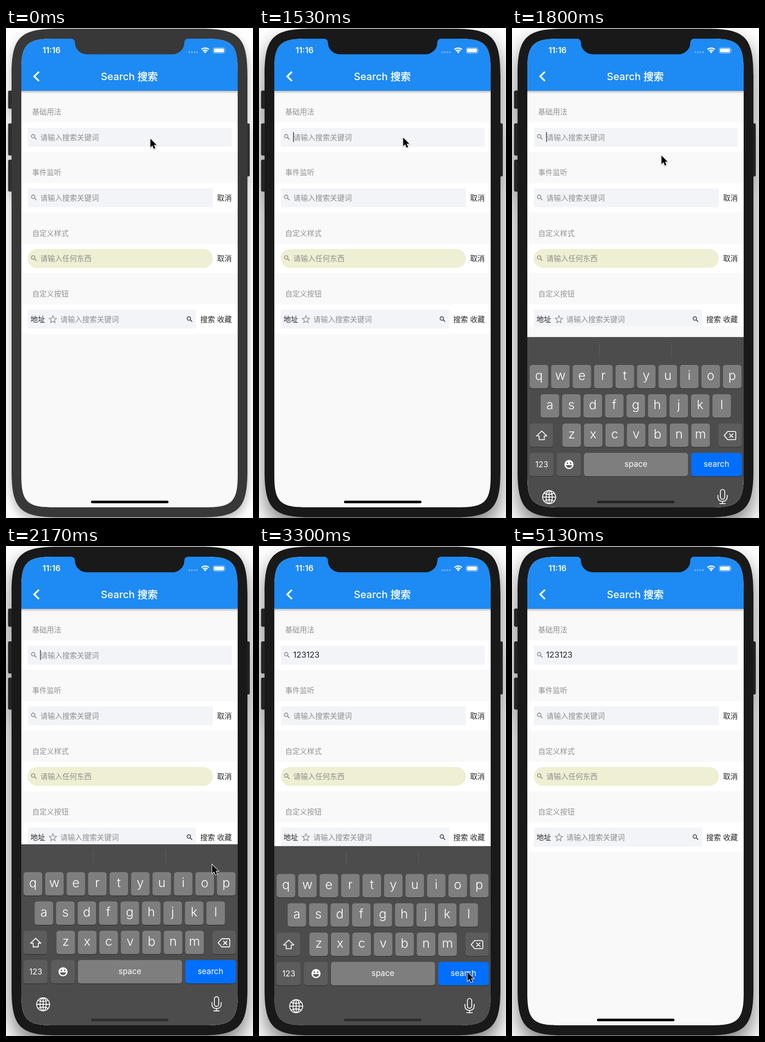
An HTML page that plays this animation: 532 by 1053 pixels, repeating every 5160 ms.

```html
<!DOCTYPE html>
<html lang="zh">
<head>
<meta charset="utf-8">
<title>Search</title>
<style>
  html, body { margin: 0; width: 100%; height: 100%; overflow: hidden; background: #fff; }
  svg { display: block; width: 100%; height: 100%; font-family: Inter, "Noto Sans CJK SC", "Noto Sans CJK", sans-serif; }
  #device { --body: #383838; --button: #2d2d2d; --shadow: drop-shadow(0 10px 11px rgba(0,0,0,.3)); }
  #device.active { --body: #191919; --button: #242424; --shadow: drop-shadow(0 22px 22px rgba(0,0,0,.52)); }
  .shell { filter: var(--shadow); }
  .body { fill: var(--body); }
  .button { fill: var(--button); stroke: var(--body); }
  .hint, .label { font-size: 15.76px; fill: #8e8e8e; }
  .label { fill: #929292; }
  .action { font-size: 15.76px; fill: #262626; }
  .field { fill: #f3f4f8; }
  .line { fill: none; stroke: #fff; stroke-width: 1.8; stroke-linecap: round; stroke-linejoin: round; }
  .letter { font-size: 27.5px; font-weight: 300; }
  .word { font-size: 17.2px; }
  .medium { stroke: #fff; stroke-width: .5px; }
  #keyboard text { fill: #fff; text-anchor: middle; }
</style>
</head>
<body>
<svg viewBox="0 0 532 1053">
  <defs>
    <clipPath id="screenClip"><path id="screenShape"/></clipPath>
    <linearGradient id="headerShadow" x1="0" y1="0" x2="0" y2="1">
      <stop offset="0" stop-color="#000" stop-opacity=".24"/>
      <stop offset="1" stop-color="#000" stop-opacity="0"/>
    </linearGradient>
    <path id="lens" d="M15.5 14h-.79l-.28-.27A6.47 6.47 0 0 0 16 9.5 6.5 6.5 0 1 0 9.5 16c1.61 0 3.09-.59 4.23-1.57l.27.28v.79l5 4.99L20.49 19zM9.5 14a4.5 4.5 0 1 1 0-9 4.5 4.5 0 0 1 0 9z"/>
  </defs>

  <g id="device">
    <g class="shell">
      <g class="button">
        <rect x="5" y="135" width="10" height="38" rx="2"/>
        <rect x="5" y="205.500" width="10" height="68" rx="2"/>
        <rect x="5" y="283.500" width="10" height="67.500" rx="2"/>
        <rect x="516" y="205.500" width="8.500" height="113" rx="2"/>
      </g>
      <path id="bodyShape" class="body"/>
    </g>

    <g clip-path="url(#screenClip)">
      <rect x="33" y="23" width="467" height="1008" fill="#f9f9f9"/>
      <g id="list"></g>
      <text id="typed" x="73.500" y="239.800" font-size="17.400" fill="#222"></text>
      <rect id="caret" y="223.500" width="1.500" height="21.500" fill="#333"/>
      <rect id="inset" x="33" y="641" width="467" height="390" fill="#f9f9f9"/>

      <rect x="33" y="135" width="467" height="6" fill="url(#headerShadow)"/>
      <rect x="33" y="23" width="467" height="112" fill="#1e8af3"/>
      <g fill="#fff">
        <text x="98" y="54" font-size="17.500" font-weight="600" text-anchor="middle">11:16</text>
        <text x="265.500" y="111.500" font-size="21.800" font-weight="500" text-anchor="middle">Search <tspan class="medium">搜索</tspan></text>
        <g opacity=".35">
          <circle cx="394.800" cy="52" r="2"/><circle cx="400.300" cy="52" r="2"/>
          <circle cx="405.800" cy="52" r="2"/><circle cx="411.200" cy="52" r="2"/>
        </g>
        <path d="M429 54.500L426 51.300A4.300 4.300 0 0 1 432 51.300Z"/>
        <rect x="448" y="44" width="21.500" height="8.600" rx="1.800"/>
        <path d="M473.400 46.300q1.700 2 0 4z" opacity=".6"/>
      </g>
      <g fill="none" stroke="#fff">
        <path d="M421 46.200A11.400 11.400 0 0 1 437 46.200M424 49.400A7.200 7.200 0 0 1 434 49.400" stroke-width="2.500"/>
        <rect x="446.200" y="42.200" width="25.300" height="12.200" rx="3.400" stroke-opacity=".6"/>
        <path d="M71 94L60.800 104L71 114" stroke-width="3.800"/>
      </g>

      <g id="keyboard"></g>
      <rect id="homeBar" x="183" y="1015.700" width="167" height="5.600" rx="2.800"/>
    </g>
    <path class="body" d="M139 22V23Q148.500 23 148.500 32A26 24.500 0 0 0 175 56.500H358A26 24.500 0 0 0 384 32Q384 23 393 23V22Z"/>
  </g>

  <path id="pointer" d="M0 0V18.500L4.300 14.600L7.200 21.600L10.600 20.200L7.700 13.300H13.300Z"
    stroke="#fff" stroke-width="2.200" paint-order="stroke" style="filter:drop-shadow(0 1px 1px rgba(0,0,0,.3))"/>
</svg>

<script>
const $ = id => document.getElementById(id);
const rect = (x, y, w, h, attrs) => `<rect x="${x}" y="${y}" width="${w}" height="${h}" ${attrs}/>`;
const text = (x, y, cls, str, attrs = '') => `<text x="${x}" y="${y}" class="${cls}" ${attrs}>${str}</text>`;
const lens = (x, y, fill) => `<use href="#lens" fill="${fill}" transform="translate(${x} ${y}) scale(.69)"/>`;

// Rectangle whose corners ease into the sides, wider than a circular arc.
function smoothRect(x, y, w, h, r) {
  const e = r * 1.528, c = e - r * 0.272;
  return `M${x + e} ${y}h${w - 2 * e}c${c} 0 ${e} ${e - c} ${e} ${e}v${h - 2 * e}c0 ${c} ${c - e} ${e} ${-e} ${e}`
    .replace(`c${c} 0 ${e} ${e - c} ${e} ${e}`, `c${c} 0 ${e} ${e - c} ${e} ${e}`)
    + `h${2 * e - w}c${-c} 0 ${-e} ${c - e} ${-e} ${-e}v${2 * e - h}c0 ${-c} ${e - c} ${-e} ${e} ${-e}z`;
}

function buildList() {
  const prompt = '请输入搜索关键词';
  const rows = [
    { title: '基础用法', width: 439, hint: prompt },
    { title: '事件监听', width: 398.5, hint: prompt, action: '取消' },
    { title: '自定义样式', width: 398.5, hint: '请输入任何东西', action: '取消', pill: true },
    { title: '自定义按钮', width: 362.5, hint: prompt, action: '收藏', custom: true },
  ];
  return rows.map((row, i) => {
    const top = 203 + i * 130.3, base = top + 37.6;
    let out = text(56.3, top - 17, 'label', row.title)
      + rect(33, top, 467, 63.3, 'fill="#fff"')
      + rect(47, top + 11.3, row.width, 40.6, row.pill ? 'rx="20.3" fill="#eeefd3"' : 'class="field"');
    if (row.action) out += text(454.8, base, 'action', row.action);
    if (row.custom) {
      out += text(52.8, base, 'action', '地址') + text(418.6, base, 'action', '搜索')
        + lens(387.3, top + 23.8, '#222')
        + `<path d="M0-10L2.600-3.400L9.600-2.800L4.200 1.900L5.900 8.800L0 5.100L-5.900 8.800L-4.200 1.900L-9.600-2.800L-2.600-3.400Z" fill="none" stroke="#888" stroke-width="1.600" transform="translate(101 ${top + 32.3}) scale(.82)"/>`
        + text(117, base, 'hint', row.hint);
    } else {
      out += lens(52, top + 23, '#747474') + text(74, base, 'hint', row.hint, i ? '' : 'id="firstHint"');
    }
    return out;
  }).join('');
}

function buildKeyboard() {
  const key = (x, y, w, fill) =>
    rect(x, y + 1.4, w, 50.2, 'rx="5.5" fill="#343434"') + rect(x, y, w, 50.2, `rx="5.5" fill="${fill}"`);
  const light = '#7e7e7e', dark = '#5c5c5c';
  let out = rect(33, 641, 467, 400, 'fill="#4c4c4c"')
    + rect(187.5, 653, 1, 27.5, 'fill="#626262"') + rect(342.8, 653, 1, 27.5, 'fill="#626262"');
  [['qwertyuiop', 38], ['asdfghjkl', 61.6], ['zxcvbnm', 108.6]].forEach(([letters, left], row) => {
    const y = 700.8 + row * 63;
    [...letters].forEach((c, i) => {
      const x = left + i * 46.25;
      out += key(x, y, 40, light) + text(x + 20, y + 32.5, 'letter', c);
    });
  });
  out += key(38, 826.8, 50.5, dark) + key(444.3, 826.8, 50.5, dark)
    + key(38, 889.8, 51.5, dark) + key(97, 889.8, 51.5, dark)
    + key(155, 889.8, 224, light) + key(386, 889.8, 109, '#006fff')
    + text(64, 921, 'word', '123') + text(267, 919.7, 'word', 'space') + text(440.3, 919.7, 'word', 'search');
  return out + `<g class="line">
    <path d="M64 843L75 853.500H69.500V861.500H58.500V853.500H53Z"/>
    <path d="M457 852.700L464.500 844H479.500Q482 844 482 846.500V859Q482 861.500 479.500 861.500H464.500ZM468.500 849L476 856.500M476 849L468.500 856.500"/>
    <circle cx="80" cy="985" r="14"/><ellipse cx="80" cy="985" rx="6.800" ry="14"/>
    <path d="M80 971V999M66 985H94M69.500 976.500Q80 982 90.500 976.500M69.500 993.500Q80 988 90.500 993.500"/>
    <rect x="448.800" y="968.500" width="9.400" height="21" rx="4.700"/>
    <path d="M443.500 981V985Q444 994 453.500 994T463.500 985V981M453.500 994V999M447.500 999H459.500"/>
  </g>
  <circle cx="122.800" cy="915" r="9.800" fill="#fff"/>
  <g fill="${dark}"><ellipse cx="119.300" cy="912" rx="1.400" ry="1.900"/><ellipse cx="126.300" cy="912" rx="1.400" ry="1.900"/>
  <path d="M116.300 916.200H129.300Q128.300 922 122.800 922T116.300 916.200Z"/></g>`;
}

const LOOP = 5160;
const ACTIVATE = 1400, FOCUS = 1460, SHOW = 1535, HIDE = 3300;
const KEY_TIMES = [2330, 2430, 2530, 2660, 2760, 2860];
// time, x, y of the pointer tip
const POINTER = [
  [0, 311, 238], [500, 311, 237], [1200, 310.5, 235.5], [1720, 310.5, 235.5], [2170, 444, 685],
  [2600, 449, 911], [3000, 449, 916], [3790, 449, 916], [3970, 456, 861], [4240, 545, 720],
];

const settle = ms => {
  const t = Math.min(Math.max(ms, 0), 450);
  return (1 - Math.exp(-t / 100)) / (1 - Math.exp(-4.5));
};

function pointerAt(t) {
  const next = POINTER.findIndex(p => p[0] > t);
  if (next < 0) return POINTER.at(-1).slice(1);
  const [t0, x0, y0] = POINTER[next - 1], [t1, x1, y1] = POINTER[next];
  const u = (t - t0) / (t1 - t0), k = u * u * (3 - 2 * u);
  return [x0 + (x1 - x0) * k, y0 + (y1 - y0) * k];
}

function render(t) {
  const typed = '123123'.slice(0, KEY_TIMES.filter(k => k <= t).length);
  const shown = settle(t - SHOW) - settle(t - HIDE);
  const [x, y] = pointerAt(t);

  $('device').classList.toggle('active', t >= ACTIVATE);
  $('typed').textContent = typed;
  $('firstHint').style.display = typed ? 'none' : '';
  $('caret').style.display = t >= FOCUS && t < HIDE ? '' : 'none';
  $('caret').setAttribute('x', typed ? 73.5 + $('typed').getComputedTextLength() : 73.5);
  $('inset').style.display = t >= SHOW && t < HIDE ? '' : 'none';
  $('keyboard').style.display = shown > 0.001 ? '' : 'none';
  $('keyboard').setAttribute('transform', `translate(0 ${389 * (1 - shown)})`);
  const tone = Math.round(46 * Math.max(0, (shown - 0.75) / 0.25));
  $('homeBar').setAttribute('fill', `rgb(${tone},${tone},${tone})`);
  $('pointer').setAttribute('transform', `translate(${x} ${y})`);
}

$('bodyShape').setAttribute('d', smoothRect(12, 1.5, 508, 1050, 66));
$('screenShape').setAttribute('d', smoothRect(33, 23, 466, 1007, 45));
$('list').innerHTML = buildList();
$('keyboard').innerHTML = buildKeyboard();
const start = performance.now();
function tick() {
  render((performance.now() - start) % LOOP);
  requestAnimationFrame(tick);
}
tick();
</script>
</body>
</html>
```
